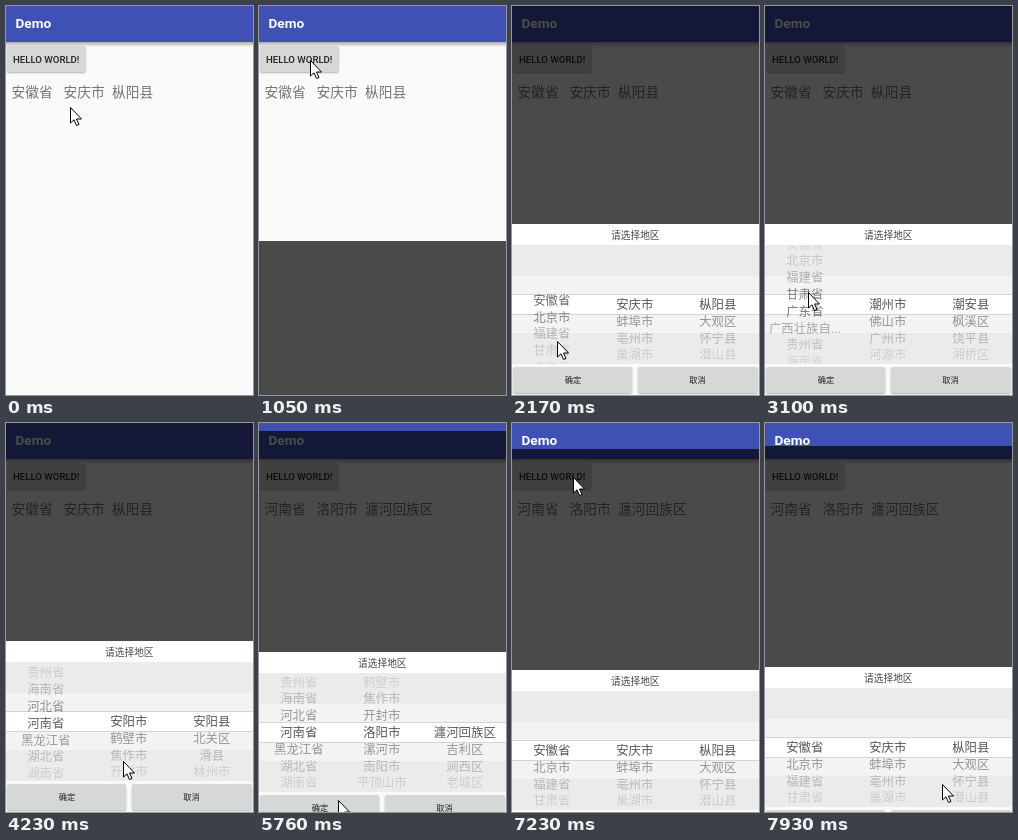
These frames come from a looping animation (247 by 389 pixels, 8000 ms). An HTML page with a canvas:

```html
<!DOCTYPE html>
<html lang="zh-CN">
<head>
<meta charset="utf-8">
<title>Demo</title>
<style>
html, body { margin: 0; width: 100%; height: 100%; overflow: hidden; background: #fafafa; }
canvas { display: block; }
</style>
</head>
<body>
<canvas id="stage" width="247" height="389"></canvas>
<script>
const W = 247, H = 389, LOOP = 8000, ROW = 16.8, MID = 298.5;
const CONFIRMED = 5760, REOPENED = 6650;
const g = document.getElementById('stage').getContext('2d');
const FONT = 'Roboto, "Noto Sans CJK SC", "Noto Sans CJK", sans-serif';

// The screen refreshes in bursts of eight steps, then rests.
const BURSTS = [0, 150, 1050, 2170, 3250, 4350, 5760, 6840, 7930], STEP = 132;

// Pointer moves: start time and destination.
const MOVES = [[20, 51, 54], [1460, 45, 335], [2400, 43, 286], [3250, 45, 262], [3670, 117, 338],
  [4350, 117, 275], [4770, 79, 377], [6180, 61, 54], [7260, 177, 361]];

const list = s => s.split(' ');
const PROVINCES = list('安徽省 北京市 福建省 甘肃省 广东省 广西壮族自... 贵州省 海南省 河北省 河南省 黑龙江省 湖北省 湖南省 吉林省');
const CITIES = [
  '安庆市 蚌埠市 亳州市 巢湖市', '北京市', '福州市 龙岩市 南平市 宁德市',
  '白银市 定西市 甘南藏族自... 嘉峪关市', '潮州市 佛山市 广州市 河源市',
  '百色市 北海市 崇左市 防城港市', '安顺市 毕节市 贵阳市 六盘水市',
  '白沙黎族自... 澄迈县 儋州市 定安县', '保定市 沧州市 承德市 邯郸市',
  '安阳市 鹤壁市 焦作市 开封市 洛阳市 漯河市 南阳市 平顶山市 濮阳市'].map(list);
const COUNTIES = [
  '枞阳县 大观区 怀宁县 潜山县', '昌平区 朝阳区 崇文区 大兴区', '仓山区 长乐市 福清市 鼓楼区',
  '白银区 会宁县 景泰县 靖远县', '潮安县 枫溪区 饶平县 湘桥区', '德保县 靖西县 乐业县 凌云县',
  '关岭布依族... 平坝县 普定县 西秀区', '白沙县', '安国市 安新县 北市区 博野县',
  '安阳县 北关区 滑县 林州市', '鹤山区 淇滨区 淇县 山城区', '博爱县 解放区 马村区 孟州市',
  '鼓楼区 金明区 开封县 兰考县', '瀍河回族区 吉利区 涧西区 老城区'].map(list);

const ramp = (t, start, length) => Math.max(0, Math.min(1, (t - start) / length));

function snap(t) {
  const start = BURSTS.findLast(b => b <= t);
  return start + Math.min(7, Math.floor((t - start) / STEP)) * STEP;
}

function popupOffset(t) {
  const open = s => H * (1 - ramp(t, s, 500)) ** 2;
  const close = s => H * ramp(t, s, 500) ** 2;
  return t < 5000 ? open(941) : t < REOPENED ? close(5676) : t < 7900 ? open(6740) : close(7801);
}

function rect(x, y, w, h, fill) {
  g.fillStyle = fill;
  g.fillRect(x, y, w, h);
}

// y is the optical middle of the line.
function text(s, x, y, size, fill, align = 'left', weight = 400) {
  g.font = `${weight} ${size}px ${FONT}`;
  g.textAlign = align;
  g.fillStyle = fill;
  g.fillText(s, x, y + size * 0.37);
}

function button(x, y, w, h) {
  g.save();
  g.shadowColor = 'rgba(0,0,0,.3)';
  g.shadowBlur = 2;
  g.shadowOffsetY = 1;
  g.fillStyle = '#d6d7d7';
  g.beginPath();
  g.roundRect(x, y, w, h, 2);
  g.fill();
  g.restore();
}

function page(t) {
  rect(0, 0, W, H, '#fafafa');
  for (let i = 0; i < 5; i++) rect(0, 36 + i, W, 1, `rgba(0,0,0,${0.28 - i * 0.06})`);
  rect(0, 0, W, 36, '#3f51b5');
  text('Demo', 9.5, 16.5, 13.6, '#fff', 'left', 700);
  button(1, 40, 78.5, 26);
  text('HELLO WORLD!', 7, 53, 9.6, '#222', 'left', 500);
  const place = t < CONFIRMED ? ['安徽省', '安庆市', '枞阳县'] : ['河南省', '洛阳市', '瀍河回族区'];
  place.forEach((s, i) => text(s, [5.5, 57.5, 106][i], 85.5, 13.7, '#757575'));
}

function wheel(items, pos, x) {
  items.forEach((s, i) => {
    const alpha = 0.66 * 0.58 ** Math.abs(i - pos);
    text(s, x, MID + (i - pos) * ROW, 12.4, `rgba(0,0,0,${alpha})`, 'center');
  });
}

function wheels(t) {
  const fresh = t > REOPENED;
  const p = fresh ? 0 : 3.6 * ramp(t, 2100, 990) + 5.3 * ramp(t, 3200, 900) + 0.1 * ramp(t, 4300, 100);
  const c = fresh ? 0 : 4 * ramp(t, 4300, 600);
  const pi = Math.round(p), ci = Math.round(c);
  g.save();
  g.beginPath();
  g.rect(0, 239, W, 119);
  g.clip();
  wheel(PROVINCES, p, 39.8);
  wheel(CITIES[pi], c, 122.8);
  wheel(COUNTIES[pi + ci], 0, 205.8);
  g.restore();
}

function popup(t) {
  const y = Math.round(popupOffset(t));
  if (y >= H) return;
  rect(0, Math.max(0, y - 3), W, H, 'rgba(0,0,0,.7)');

  g.save();
  g.translate(0, y);
  rect(0, 218, W, 171, '#fafafa');
  rect(0, 218, W, 21, '#fff');
  text('请选择地区', 123.3, 229.5, 9.7, '#444', 'center');
  rect(0, 239, W, 119, '#ebebeb');
  rect(0, 270, W, 57, '#f3f3f3');
  rect(0, 288, W, 21, '#d4d4d4');
  rect(0, 289, W, 19, '#fff');
  wheels(t);
  button(1, 361, 119, 26);
  button(126, 361, 120, 26);
  text('确定', 61, 374, 8.2, '#222', 'center');
  text('取消', 185.5, 374, 8.2, '#222', 'center');
  g.restore();
}

function pointer(t) {
  let x = 64, y = 101;
  for (const [start, toX, toY] of MOVES) {
    const p = ramp(t, start, 420);
    x += (toX - x) * p;
    y += (toY - y) * p;
  }
  g.save();
  g.translate(Math.round(x) + 0.5, Math.round(y) + 0.5);
  const arrow = new Path2D('M0 0V15.5L3.5 12.3L6 18L8.5 17L6 11.5H11Z');
  g.fillStyle = '#fff';
  g.fill(arrow);
  g.stroke(arrow);
  g.restore();
}

function draw() {
  const t = snap(performance.now() % LOOP);
  page(t);
  popup(t);
  pointer(t);
  requestAnimationFrame(draw);
}
draw();
</script>
</body>
</html>
```
